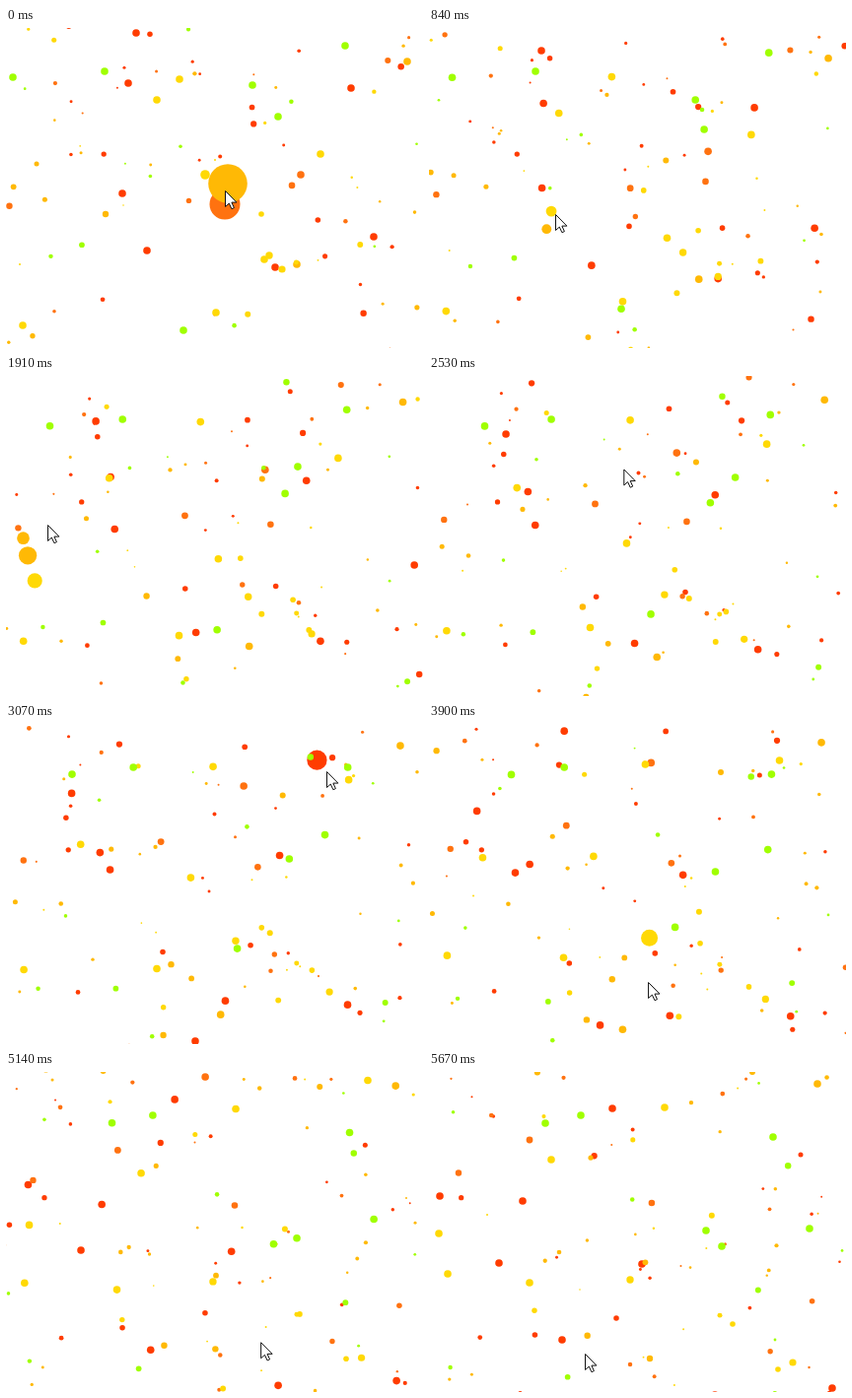
These frames come from a looping animation (423 by 325 pixels, 5750 ms). An HTML page with a canvas:

```html
<!DOCTYPE html>
<html lang="en">
<head>
<meta charset="utf-8">
<title>Bubbles</title>
<style>
  html, body { margin: 0; height: 100%; overflow: hidden; background: #fff; }
  canvas { display: block; }
</style>
</head>
<body>
<canvas id="stage" width="423" height="325"></canvas>
<script>
const W = 423, H = 325, LOOP = 5750, STEP = 76.6, LAST = 74, SPAN = LAST * STEP;
const ctx = document.getElementById("stage").getContext("2d");
const COLORS = ["#ff3c00", "#ff7210", "#ffb905", "#ffd905", "#a0ff00"];
const [RED, ORANGE, AMBER, YELLOW, GREEN] = COLORS.keys();
const dots = [];

function addDot(color, x, y, endX, endY, r, peakAt = 0, peak = 0) {
  dots.push({ color, x, y, vx: (endX - x) / SPAN, vy: (endY - y) / SPAN, r, peakAt, peak });
}

// Large drifting dots: start and end of each straight path
const drifting = [
  [RED, [[350, 61, 216, 195], [132, 5, 11, 126], [118, 168, 95, 131], [124, 56, 71, 194],
         [373, 212, 495, 153], [143, 226, 290, 328], [273, 243, 409, 321],
         [259, 381, 135, 272], [29, -59, 186, 37]]],
  [ORANGE, [[299, 149, 192, -10]]],
  [AMBER, [[407, 34, 394, 12], [295, 240, 152, 342]]],
  [YELLOW, [[319, 128, 372, -4], [176, 52, 239, 36], [153, 73, 10, 164],
            [213, 289, 102, 214], [17, 302, 19, 205], [262, 235, 124, 89]]],
  [GREEN, [[276, 90, 297, 177], [250, 58, 386, 159], [180, 307, 281, 161],
           [7, 50, 118, 52], [100, 44, 154, 44], [344, 18, 349, 66]]],
];
for (const [color, paths] of drifting)
  for (const path of paths) addDot(color, ...path, 3.8);

// Dots the pointer swells: path, resting radius, time of peak, peak radius
addDot(RED, 243, -19, 377, 84, 2.5, 3070, 10.3);
addDot(ORANGE, 222, 179, 102, 69, 3.4, 0, 15.5);
addDot(AMBER, 101, 189, 224, 291, 3.2, 840, 5);
addDot(AMBER, 225, 158, 328, 0, 3, 0, 19.8);
addDot(AMBER, -34, 182, 132, 183, 2.3, 1910, 9.3);
addDot(AMBER, 31, 138, -9, 217, 2.5, 1910, 6.5);
addDot(YELLOW, 14, 240, 59, 145, 1, 1910, 7.7);
addDot(YELLOW, 119, 180, 153, 221, 0.8, 840, 5.5);
addDot(YELLOW, 267, 231, 204, 211, 3.7, 3900, 8.7);
addDot(YELLOW, 259, 189, 354, 302, 2.8, 4610, 13.5);
addDot(YELLOW, 280, 245, 369, 295, 3.6, 4610, 11.5);
addDot(YELLOW, 202, 149, 308, 256, 2.8, 0, 4.8);
addDot(GREEN, 421, 337, 351, 272, 1.4, 4610, 7);

// Small dots scattered over the stage and a margin around it
let seed = 29;
function random() {
  seed = (seed * 16807) % 2147483647;
  return seed / 2147483647;
}
const between = (a, b) => a + (b - a) * random();
for (let i = 0; i < 170; i++) {
  const color = Math.floor(random() * 9 / 2);
  const x = between(-85, W + 85), y = between(-85, H + 85);
  const dx = between(-85, 85), dy = between(-85, 85);
  addDot(color, x - dx, y - dy, x + dx, y + dy, between(0.9, 3.3));
}
dots.sort((a, b) => a.color - b.color);

const pointerPath = [
  [0, 222, 165], [840, 128, 189], [1500, 22, 190], [1910, 42, 151], [3070, 325, 48],
  [3650, 226, 205], [3900, 222, 262], [4380, 345, 284], [4610, 354, 263], [5670, 158, 286],
];
function pointerAt(t) {
  let i = 1;
  while (i < pointerPath.length - 1 && t > pointerPath[i][0]) i++;
  const [t0, x0, y0] = pointerPath[i - 1], [t1, x1, y1] = pointerPath[i];
  const p = Math.min(1, (t - t0) / (t1 - t0)), e = p * p * (3 - 2 * p);
  return [x0 + (x1 - x0) * e, y0 + (y1 - y0) * e];
}

const arrow = new Path2D("M0 0V16L3.8 12.6L6.4 18.2L8.9 17.1L6.4 11.6H11.4Z");

function draw(t) {
  ctx.fillStyle = "#fff";
  ctx.fillRect(0, 0, W, H);
  for (const d of dots) {
    const r = Math.max(d.r, d.peak - Math.abs(t - d.peakAt) * 0.03);
    ctx.fillStyle = COLORS[d.color];
    ctx.beginPath();
    ctx.arc(d.x + d.vx * t, d.y + d.vy * t, r, 0, Math.PI * 2);
    ctx.fill();
  }
  const [x, y] = pointerAt(t);
  ctx.save();
  ctx.translate(x + 0.5, y + 0.5);
  ctx.fillStyle = "#fff";
  ctx.fill(arrow);
  ctx.strokeStyle = "#111";
  ctx.lineWidth = 1;
  ctx.stroke(arrow);
  ctx.restore();
}

const start = performance.now();
function tick() {
  const t = (performance.now() - start) % LOOP;
  draw(Math.min(LAST, Math.floor((t + 8) / STEP)) * STEP);
  requestAnimationFrame(tick);
}
tick();
</script>
</body>
</html>
```
